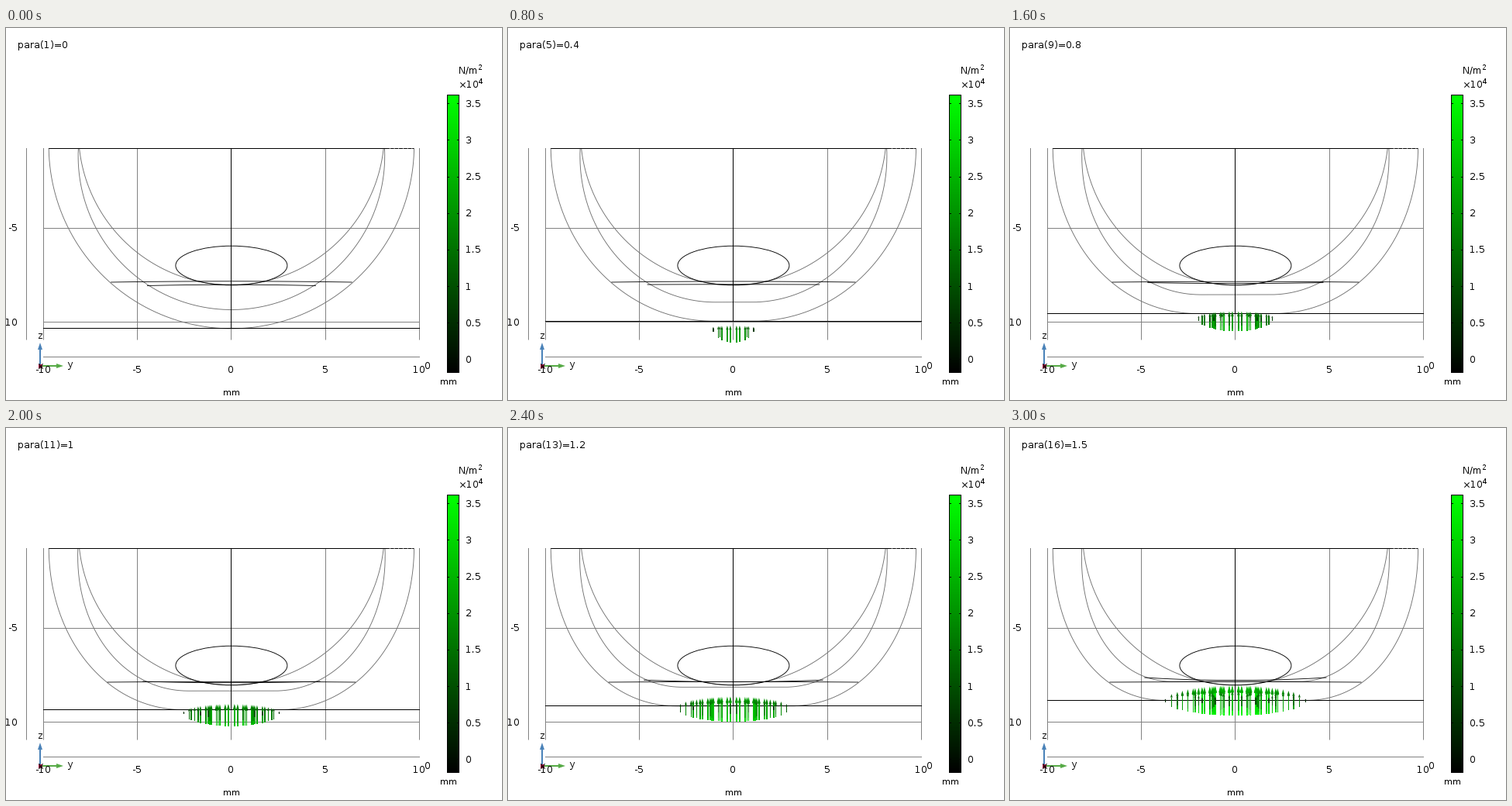
A matplotlib script that plays this animation: 640 px wide and 480 px high, repeating every 3200 ms.

```python
import numpy as np
import matplotlib.pyplot as plt
from matplotlib.animation import FuncAnimation
from matplotlib.collections import PolyCollection
from matplotlib.colors import LinearSegmentedColormap
from matplotlib.patches import Ellipse, Polygon, Rectangle

W, H, DPI = 640, 480, 80
PX = 72 / DPI            # points per pixel
SCALE = 24.27            # pixels per mm
CX = 290.9               # axis of symmetry
FRAMES, INTERVAL = 16, 200
GRAY, EDGE = "#828282", "#707070"

plt.rcParams["font.family"] = "DejaVu Sans"
plt.rcParams["text.hinting"] = "native"
plt.rcParams["text.hinting_factor"] = 1
fig = plt.figure(figsize=(W / DPI, H / DPI), dpi=DPI, facecolor="white")
ax = fig.add_axes([0, 0, 1, 1])
ax.axis("off")


def pixel(v):
    """Centre of the pixel that holds v."""
    return np.floor(v) + 0.5


def line(x, y, color="black", width=1.0, z=2, **kw):
    return ax.plot(x, y, color=color, lw=width * PX, zorder=z, snap=False,
                   solid_capstyle="butt", **kw)[0]


def text(x, y, s, size=12, ha="left"):
    return ax.text(x, y, s, fontsize=size * PX, ha=ha, va="baseline", zorder=8)


def draw_grid():
    for x in [26.5] + [pixel(CX + v * SCALE) for v in (-10, -5, 0, 5, 10)]:
        line([x, x], [155, 402.5], GRAY, z=1)
    for y in (258.5, 379.5, 424.5):
        line([48, 534], [y, y], GRAY, z=1)
    for v in (-10, -5, 0, 5, 10):
        text(CX + v * SCALE - 0.5, 445, f"{v}", ha="center")
    text(540, 440, "0")
    text(14.5, 262.5, "-5", ha="right")
    text(14.5, 384, "-10", ha="right")
    text(CX, 474, "mm", 11, "center")


def draw_triad():
    blue, green = "#4a82b8", "#56aa46"
    line([44, 44], [436, 414], blue, 2, 6)
    ax.add_patch(Polygon([(41, 415), (47, 415), (44, 406)], color=blue, lw=0, zorder=6))
    line([44, 66], [436, 436], green, 2, 6)
    ax.add_patch(Polygon([(65, 433), (65, 439), (74, 436)], color=green, lw=0, zorder=6))
    ax.add_patch(Rectangle((41.5, 433.5), 5, 5, color="#b0104a", lw=0, zorder=6))
    text(44, 401, "z", ha="center")
    text(79, 438, "y")
    text(44.5, 440, "x", ha="center")


def draw_colorbar():
    cmap = LinearSegmentedColormap.from_list("load", ["black", "lime"])
    ax.imshow(np.linspace(1, 0, 358)[:, None], cmap=cmap, aspect="auto",
              extent=(569, 585, 445, 86), zorder=2)
    ax.add_patch(Rectangle((569.5, 86.5), 15, 358, fill=False, ec="black",
                           lw=PX, zorder=3, snap=False))
    for i in range(8):
        y = 427.5 - 47.1 * i
        text(593, y + 4.2, f"{i / 2:g}")
        line([569, 572], [pixel(y)] * 2, z=4)
        line([582, 585], [pixel(y)] * 2, z=4)
    text(584, 59, "N/m")
    text(608.5, 54, "2", 9)
    text(584, 77, "×10")
    text(609, 72, "4", 9)
    text(571, 460, "mm", 11, "center")


def draw_fixed_shapes():
    line([55, 490], [155.5, 155.5], z=4)
    line([490, 526.5], [155.5, 155.5], z=4, dashes=(5, 0.7))
    t = np.linspace(-1.463, 1.463, 200)
    line(CX + 197.4 * np.sin(t), 134.2 + 197.4 * np.cos(t), EDGE, 0.9)
    ax.add_patch(Ellipse((CX, 306.5), 144, 50.6, fill=False, ec="black",
                         lw=0.9 * PX, zorder=4))


def shell(p, top, half, bottom, flat, start):
    """Round shell with a flattened contact zone at the bottom."""
    n = 2 + 0.06 * p * p
    t = np.linspace(start, np.pi / 2, 150)
    c, s = np.cos(t), np.sin(t)
    x = flat + (half - flat) * np.sign(c) * np.abs(c) ** (2 / n)
    y = top + (bottom - top) * np.sign(s) * np.abs(s) ** (2 / n)
    return np.r_[CX - x, CX + x[::-1]], np.r_[y, y[::-1]]


def bow(half, end, mid):
    u = np.linspace(-1, 1, 60)
    return CX + half * u, mid + (end - mid) * u * u


# sample points of the contact patch: distance from axis, depth
COLUMNS = (4, 8, 15, 17.5, 19.5, 26, 28, 30, 33, 40, 43, 47.5, 52, 54.5,
           61.5, 68.5, 75, 82.5, 90.5)
POINTS = [(side * y, d)
          for i, y in enumerate(COLUMNS)
          for d in (12 * (i % 4 == 3), 30 + 5 * (i * 7 % 5), 66 + 6 * (i * 3 % 4))
          for side in (-1, 1)]


def arrow(x, y, size):
    """Shaft and head of an upright arrow centred on (x, y)."""
    tip, tail = y - size / 2, y + size / 2
    neck = tip + min(0.2 * size + 1, size)
    head, shaft = 0.035 * size + 0.8, 0.65
    return ([(x - shaft, neck), (x + shaft, neck), (x + shaft, tail), (x - shaft, tail)],
            [(x, tip), (x + head, neck), (x - head, neck)])


def load_arrows(p, plate):
    verts, colors = [], []
    if p == 0:
        return verts, colors
    radius, peak = 58 * p + 4, 21 + 8 * p * p
    d = 1.5 - p
    drop = 12.5 * d + 2.5 * d * d
    found = []
    for x, depth in POINTS:
        q = 1 - (x * x + depth * depth) / radius ** 2
        if q > 0.004:
            found.append((q ** 0.5, x))
    for s, x in sorted(found, reverse=True):
        green = min(1, (peak * s / 39) ** 0.8)
        verts += arrow(CX + x, plate + drop * (1 + s) / 2, peak * s)
        colors += [(0, green, 0), (0, 0.75 * green, 0)]
    return verts, colors


draw_grid()
draw_triad()
draw_colorbar()
draw_fixed_shapes()
title = text(15, 26, "")
outer = line([], [], EDGE, 0.9)
middle = line([], [], EDGE, 0.9)
upper = line([], [], "black", 0.85, 4)
lower = line([], [], "black", 0.85, 4)
floor = line([], [], "black", 1, 4)
axis = line([], [], "black", 1, 4)
arrows = PolyCollection([], linewidths=0, zorder=5)
ax.add_collection(arrows, autolim=False)
ax.set_xlim(0, W)
ax.set_ylim(H, 0)


def update(k):
    p = k / 10
    plate = 387.9 - SCALE * p
    flat = 58 * p + 3 if k else 0
    title.set_text(f"para({k + 1})={p:g}")
    outer.set_data(*shell(p, 152, 235.7, plate, flat, 0.015))
    middle.set_data(*shell(p, 165.3, 197.8 + 0.5 * p, 363.5 - SCALE * p,
                           0.9 * flat, -0.05))
    upper.set_data(*bow(155.7 + 4.6 * p, 328, 326.8 + 0.5 * p))
    lower.set_data(*bow(109 + 5.7 * p, 332.5 - 2.5 * p - 3 * p * p,
                        331.2 - 2.5 * p * p))
    floor.set_data([48, 534], [pixel(plate)] * 2)
    axis.set_data([pixel(CX)] * 2, [155, plate])
    verts, colors = load_arrows(p, plate)
    arrows.set_verts(verts)
    arrows.set_facecolor(colors)
    return title, outer, middle, upper, lower, floor, axis, arrows


anim = FuncAnimation(fig, update, frames=FRAMES, interval=INTERVAL,
                     repeat=True, repeat_delay=0, blit=False)
plt.show()
```
